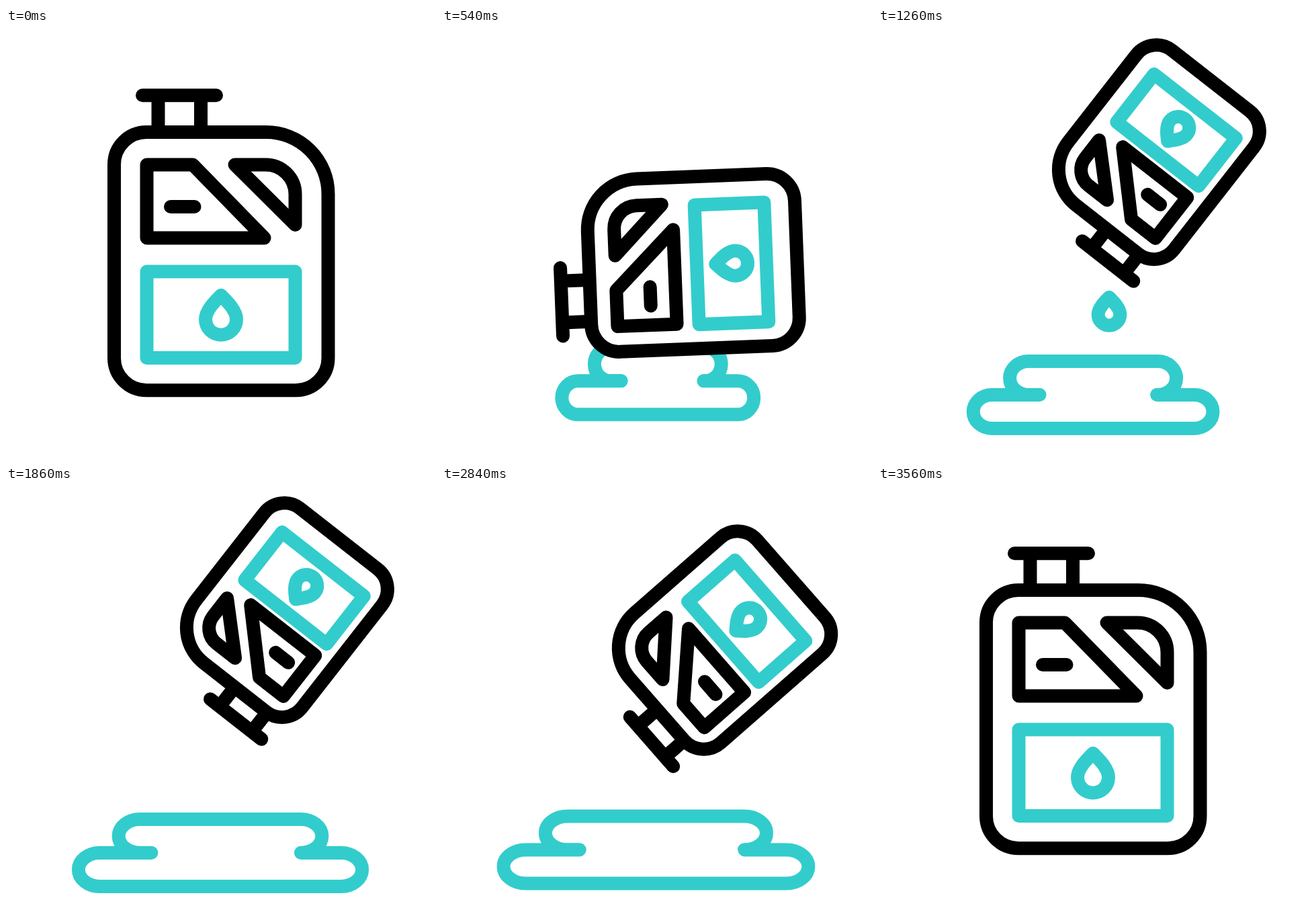
An HTML page with a canvas for the animation above (3.6 s loop, 640x640 px).

```html
<!DOCTYPE html>
<html lang="en">
<head>
<meta charset="utf-8">
<title>Pouring canister</title>
<style>
html, body { margin: 0; width: 100%; height: 100%; overflow: hidden; background: #fff; }
canvas { display: block; width: 640px; height: 640px; }
</style>
</head>
<body>
<canvas id="stage" width="640" height="640"></canvas>
<script>
const ctx = document.getElementById('stage').getContext('2d');
const LOOP = 3600, POUR_START = 900, POUR_END = 2700, RETURN_END = 3560;
const BLACK = '#000', TEAL = '#33cccc', WHITE = '#fff';
const TILT = -142 * Math.PI / 180;

const clamp = v => Math.min(1, Math.max(0, v));
const mix = (a, b, k) => a + (b - a) * k;
const smooth = v => { v = clamp(v); return v * v * (3 - 2 * v); };

// Eased like cubic-bezier(.333, 0, .6, 1)
function settle(x) {
  x = clamp(x);
  let lo = 0, hi = 1;
  for (let i = 0; i < 24; i++) {
    const s = (lo + hi) / 2, r = 1 - s;
    if (r * r * s + 1.8 * r * s * s + s * s * s < x) lo = s; else hi = s;
  }
  return smooth(lo);
}

function paint(color, build, fill) {
  ctx.beginPath();
  build();
  if (fill) { ctx.fillStyle = fill; ctx.fill(); }
  ctx.strokeStyle = color;
  ctx.stroke();
}

function polygon(points) {
  points.forEach(([x, y], i) => i ? ctx.lineTo(x, y) : ctx.moveTo(x, y));
  ctx.closePath();
}

function line(x1, y1, x2, y2) {
  ctx.moveTo(x1, y1);
  ctx.lineTo(x2, y2);
}

// Teardrop around the centre of its round part
function teardrop(x, y, k) {
  ctx.moveTo(x, y - 36 * k);
  ctx.bezierCurveTo(x - 10 * k, y - 26 * k, x - 23 * k, y - 13 * k, x - 23 * k, y);
  ctx.arc(x, y, 23 * k, Math.PI, 0, true);
  ctx.bezierCurveTo(x + 23 * k, y - 13 * k, x + 10 * k, y - 26 * k, x, y - 36 * k);
  ctx.closePath();
}

function drawCan(m) {
  const at = (a, b) => mix(a, b, m);
  const angle = TILT * m, c = Math.cos(angle), s = Math.sin(angle);
  const armX = at(-13.6, -96), armY = at(64.4, 199);

  ctx.save();
  ctx.translate(at(333.6, 245.9) + c * armX - s * armY,
                at(362.35, 249.7) + s * armX + c * armY);
  ctx.rotate(angle);

  const left = at(-159, -106.6), right = at(159.5, 116);
  const top = at(-271.75, -180), bottom = at(112.5, 89.5);
  const r = at(48, 38), shoulder = at(92, 67);

  // Neck and cap
  const capY = at(-326.5, -216.4), neckL = at(-93.5, -70), neckR = at(-30, -9);
  ctx.fillStyle = WHITE;
  ctx.fillRect(neckL, capY, neckR - neckL, top - capY);
  paint(BLACK, () => {
    line(neckL, capY, neckL, top);
    line(neckR, capY, neckR, top);
    line(at(-117, -88.1), capY, at(-7, 8.7), capY);
  });

  // Body
  paint(BLACK, () => {
    ctx.moveTo(left + r, top);
    ctx.arcTo(right, top, right, bottom, shoulder);
    ctx.arcTo(right, bottom, left, bottom, r);
    ctx.arcTo(left, bottom, left, top, r);
    ctx.arcTo(left, top, right, top, r);
    ctx.closePath();
  }, WHITE);

  // Window with level mark
  const winL = at(-110.5, -74.5), winT = at(-223.25, -146), winB = at(-114.25, -69);
  paint(BLACK, () => polygon([
    [winL, winT], [at(-42, -29), winT], [at(64.5, 47.5), winB], [winL, winB]
  ]));
  const markY = at(-160.75, -102);
  paint(BLACK, () => line(at(-75, -49.4), markY, at(-39.5, -25.2), markY));

  // Handle opening
  const gripR = at(110.5, 81.4), gripT = at(-223.25, -145.4), gripB = at(-133.75, -82.6);
  paint(BLACK, () => {
    ctx.moveTo(at(20.5, 17.1), gripT);
    ctx.arcTo(gripR, gripT, gripR, gripB, at(44, 29));
    ctx.lineTo(gripR, gripB);
    ctx.closePath();
  });

  // Label
  const w = at(110.5, 77.3), h = at(64.25, 45.2);
  paint(TEAL, () => polygon([[-w, -h], [w, -h], [w, h], [-w, h]]));
  paint(TEAL, () => teardrop(0, at(7, 4.6), at(1, 0.71)));
  ctx.restore();
}

function drawPuddle(h, m) {
  const grow = h - 152;
  const cx = 321 - grow * 0.034, y = 487 + 59 * m;
  const low = y + 25, high = y - 25;
  const rx = 25 + grow * 0.108, upper = 102 + grow * 0.835;
  const tipL = cx - 61 - grow * 0.705, tipR = cx + 75 + grow * 0.76;
  const cap = (x, cy, from, ccw) =>
    ctx.ellipse(x, cy, rx, 25, 0, from, -from, ccw);
  const q = Math.PI / 2;

  paint(TEAL, () => {
    ctx.moveTo(tipL, y);
    cap(cx - upper + rx, high, q, false);
    cap(cx + upper - rx, high, -q, false);
    ctx.lineTo(tipR, y);
  }, WHITE);
  paint(TEAL, () => {
    ctx.moveTo(tipL, y);
    cap(cx - h + rx, low, -q, true);
    cap(cx + h - rx, low, q, true);
    ctx.lineTo(tipR, y);
  }, WHITE);
}

function drawFallingDrop(t) {
  if (t < POUR_START || t >= POUR_END) return;
  const p = ((t - POUR_START) % 900) / 760;
  if (p < 1) paint(TEAL, () => teardrop(344, mix(320, 550, smooth(p)), 0.71), WHITE);
}

function draw(t) {
  const m = t < POUR_END
    ? smooth(t / POUR_START)
    : 1 - settle((t - POUR_END) / (RETURN_END - POUR_END));
  const spread = t < POUR_END ? smooth(t / POUR_END) : m;

  ctx.fillStyle = WHITE;
  ctx.fillRect(0, 0, 640, 640);
  ctx.lineWidth = 20;
  ctx.lineCap = ctx.lineJoin = 'round';
  drawFallingDrop(t);
  drawPuddle(mix(132.25, 234.6, spread), m);
  drawCan(m);
}

const start = performance.now();
function frame() {
  draw((performance.now() - start) % LOOP);
  requestAnimationFrame(frame);
}
frame();
</script>
</body>
</html>
```
